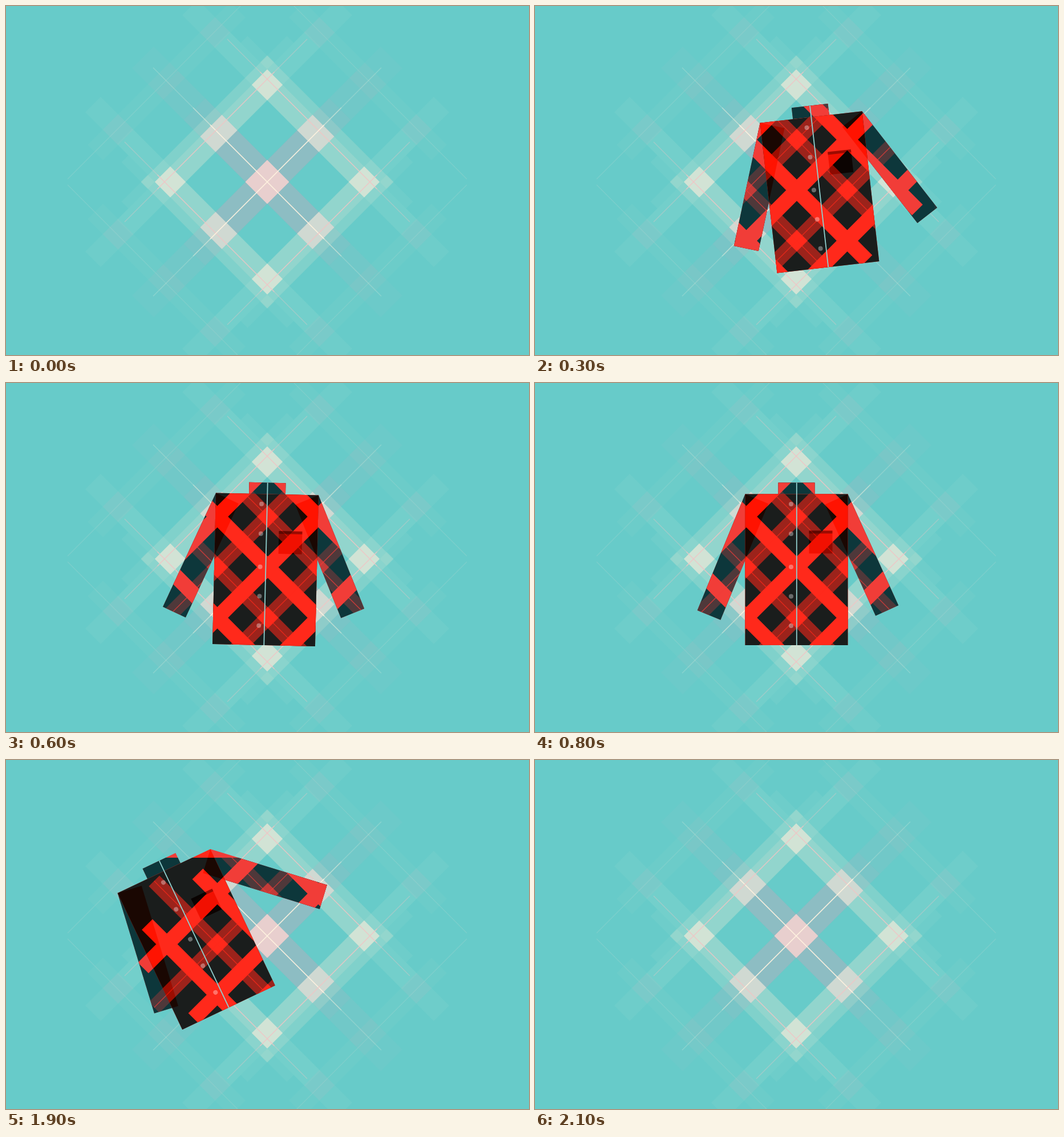
These frames come from a looping animation (917 by 611 pixels, 2200 ms). An HTML page with a canvas:

```html
<!DOCTYPE html>
<html lang="en">
<head>
<meta charset="utf-8">
<title>Plaid shirt</title>
<style>
html, body { margin: 0; width: 100%; height: 100%; overflow: hidden; background: #67cbc9; }
canvas { display: block; width: 917px; height: 611px; }
</style>
</head>
<body>
<canvas id="stage" width="917" height="611"></canvas>
<script>
const W = 917, H = 611, LOOP = 2200, STEP = 100;
const ctx = document.getElementById('stage').getContext('2d');

// Diagonal axes: u runs along x + y, v along x - y.
const diagonal = (c, x, y) => c.transform(.5, .5, .5, -.5, x, y);

// Fills a band across u or v, centred at `at`.
function band(c, alongU, at, half, reach, color) {
  c.fillStyle = color;
  if (alongU) c.fillRect(-reach, at - half, 2 * reach, 2 * half);
  else c.fillRect(at - half, -reach, 2 * half, 2 * reach);
}

function node(c, u, v, hu, hv, color) {
  c.fillStyle = color;
  c.fillRect(u - hu, v - hv, 2 * hu, 2 * hv);
}

function makeBackdrop() {
  const cv = document.createElement('canvas');
  cv.width = W;
  cv.height = H;
  const c = cv.getContext('2d');
  c.fillStyle = '#67cbc9';
  c.fillRect(0, 0, W, H);
  diagonal(c, 458, 308);
  const mauve = a => `rgba(185,170,186,${a})`;
  const cream = a => `rgba(210,225,208,${a})`;
  const SIDE = 170, OUTER = 353;

  for (const dir of [true, false]) {
    for (const [reach, a] of [[436, .05], [350, .06], [255, .1], [197, .3]])
      band(c, dir, 0, 38, reach, mauve(a));
    for (const s of [-1, 1]) {
      for (const [reach, a] of [[441, .06], [330, .05], [197, .33]])
        band(c, dir, s * SIDE, 27, reach, cream(a));
      for (const [reach, a] of [[290, .06], [222, .17]])
        band(c, dir, s * (SIDE + 39), 12, reach, cream(a));
      band(c, dir, s * OUTER, 27, 250, cream(.045));
    }
  }

  for (const s of [-1, 1]) {
    node(c, s * SIDE, 0, 27, 38, '#d0d9d2');
    node(c, 0, s * SIDE, 38, 27, '#d0d9d2');
    node(c, s * OUTER, 0, 27, 38, mauve(.06));
    node(c, 0, s * OUTER, 38, 27, mauve(.06));
    for (const r of [-1, 1]) {
      node(c, s * SIDE, r * SIDE, 27, 27, '#d2e3d5');
      node(c, s * OUTER, r * SIDE, 27, 27, mauve(.09));
      node(c, s * SIDE, r * OUTER, 27, 27, mauve(.09));
    }
  }
  node(c, 0, 0, 38.5, 38.5, '#e8cfce');

  for (const dir of [true, false]) {
    for (const [reach, a] of [[400, .2], [260, .35], [200, .8]])
      band(c, dir, 0, 1.1, reach, `rgba(255,243,224,${a})`);
    for (const s of [-1, 1]) {
      for (const [reach, a] of [[320, .35], [205, .75]])
        band(c, dir, s * 180, 1, reach, `rgba(240,196,196,${a})`);
      band(c, dir, s * 355, .8, 345, 'rgba(190,215,205,.25)');
    }
  }
  return cv;
}

const BODY = { red: '#ff291b', dark: '#1a1d1c', dim: .57, cross: 1, fade: 1.7 };
const SLEEVE = { red: '#f13d38', dark: '#0d373b', dim: .29, cross: .62, fade: 1 };
const EDGES = [722, 757, 785, 814, 843, 871, 899];
const FADES = [.56, .5, .42, .34, .2, .1];

// The cloth stays put on the stage; the shirt is a window onto it.
function cloth(shape, look) {
  const { red, dark } = look;
  ctx.save();
  ctx.clip(shape);
  ctx.fillStyle = red;
  ctx.fillRect(195, 0, 527, H);
  FADES.forEach((f, i) => {
    const x = EDGES[i], w = EDGES[i + 1] - x;
    ctx.globalAlpha = Math.min(1, f * look.fade);
    ctx.fillRect(x, 0, w, H);
    ctx.fillRect(W - x - w, 0, w, H);
  });
  ctx.globalAlpha = 1;
  ctx.fillStyle = dark;
  ctx.fillRect(195, 171, 505, 303);
  ctx.globalAlpha = .93;
  ctx.fillRect(700, 171, 22, 303);

  diagonal(ctx, 459, 322.5);
  const HALF = 18.7, GAP = 88.5;
  for (const dir of [true, false])
    for (const s of [-1, 1]) {
      ctx.globalAlpha = look.dim;
      band(ctx, dir, s * GAP, HALF, 310, red);
    }
  ctx.globalAlpha = look.cross;
  for (const u of [-GAP, GAP])
    for (const v of [-GAP, GAP]) node(ctx, u, v, HALF, HALF, red);
  for (const dir of [true, false]) {
    ctx.globalAlpha = .75;
    for (const s of [-1, 1]) band(ctx, dir, s * GAP, .9, 310, red);
    ctx.globalAlpha = 1;
    for (const s of [-2, 0, 2]) band(ctx, dir, s * GAP, HALF, dir ? 246 : 260, red);
  }
  ctx.restore();
}

function box(m, x, y, w, h) {
  const r = new Path2D(), p = new Path2D();
  r.rect(x, y, w, h);
  p.addPath(r, m);
  return p;
}

function deepen(shape, color) {
  ctx.globalCompositeOperation = 'difference';
  ctx.fillStyle = color;
  ctx.fill(shape);
  ctx.globalCompositeOperation = 'source-over';
}

function shirt([x, tilt, left, right]) {
  const m = new DOMMatrix().translate(x, 194.5).rotate(tilt);
  const arms = [
    box(m.translate(-90, 0).rotate(left - tilt), 0, 0, 44, 220),
    box(m.translate(90, 0).rotate(right - tilt), -44, 0, 44, 214)
  ];
  const body = box(m, -90, 0, 180, 264.5);

  for (const arm of arms) cloth(arm, SLEEVE);
  cloth(box(m, -32, -20, 64, 20), SLEEVE);
  cloth(body, BODY);

  ctx.save();
  ctx.clip(body);
  for (const arm of arms) deepen(arm, 'rgb(0,22,26)');
  deepen(box(m, 22, 64, 41, 40), 'rgb(14,25,26)');
  ctx.fillStyle = 'rgba(0,0,0,.35)';
  ctx.fill(box(m, 22, 64, 41, 5));
  ctx.restore();

  ctx.fillStyle = '#90d0ce';
  ctx.fill(box(m, -.6, -20, 1.8, 284.5));
  ctx.save();
  ctx.translate(x, 194.5);
  ctx.rotate(tilt * Math.PI / 180);
  ctx.fillStyle = 'rgba(255,255,255,.35)';
  for (const y of [17.5, 69.5, 127.5, 179, 230.5]) {
    ctx.beginPath();
    ctx.arc(-9.5, y, 4, 0, 7);
    ctx.fill();
  }
  ctx.restore();
}

// Neck x, body tilt, left and right sleeve angles, one pose per step.
const ENTER = [
  [672, -36, -38, -91],
  [558.5, -22.4, -15, -69.4],
  [484, -6.5, 12, -38],
  [456, 5.8, 34, -13.6],
  [457, 3.6, 29.5, -17.5],
  [458, 1.3, 25, -22],
  [458.4, .4, 23.2, -23.7],
  [458.5, 0, 22.4, -24.5]
];
const LEAVE = [
  [380, -9.25, 8, -47.7],
  [277, -25.4, -17, -72.9],
  [111, -44, -45, -90]
];

function poseAt(step) {
  if (step < 1) return null;
  if (step < 18) return ENTER[Math.min(step, 8) - 1];
  return LEAVE[step - 18];
}

const backdrop = makeBackdrop();
function draw() {
  const pose = poseAt(Math.floor(performance.now() % LOOP / STEP));
  ctx.drawImage(backdrop, 0, 0);
  if (pose) shirt(pose);
  requestAnimationFrame(draw);
}
draw();
</script>
</body>
</html>
```
